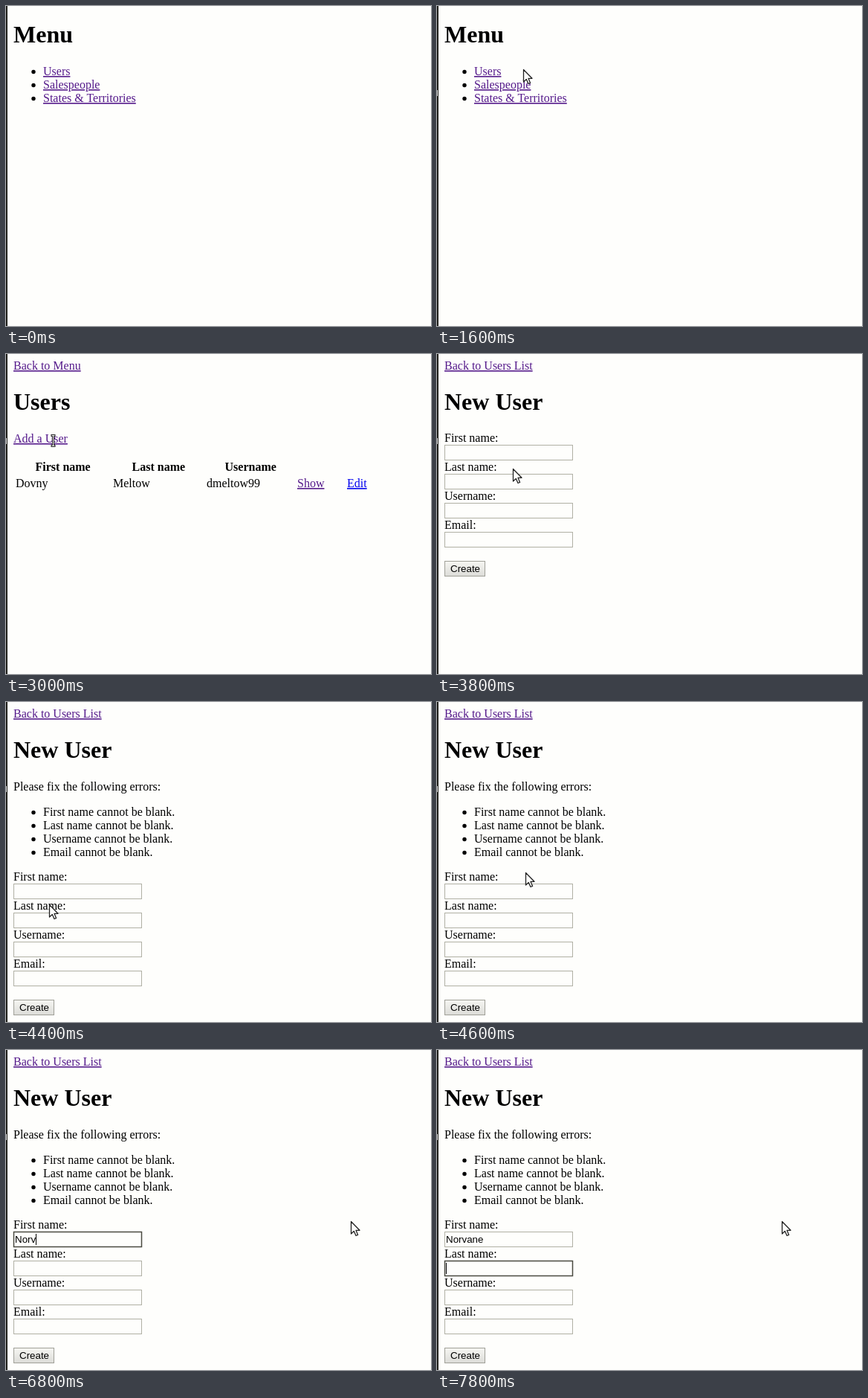
Animation of 572 by 430 pixels, one loop 8 s. Source, as an HTML page:

```html
<!DOCTYPE html>
<html lang="en">
<head>
<meta charset="utf-8">
<title>User form demo</title>
<style>
html, body { margin: 0; width: 100%; height: 100%; overflow: hidden; background: #fefefc; }
svg { display: block; }
text { font: 16px "Liberation Serif", serif; }
.title { font-size: 32px; font-weight: bold; }
.head { font-weight: bold; }
.link {
  fill: #551a8b;
  text-decoration: underline 1px;
  text-underline-offset: 1px;
  text-decoration-skip-ink: none;
}
.fresh { fill: #0000ee; }
.ui { font: 13.333px "Liberation Sans", sans-serif; }
.field { fill: #fefefc; stroke: #b0b0a4; }
.focused { stroke: #4a4a40; stroke-width: 1.5; }
.button { fill: url(#buttonFill); stroke: #a0a098; }
.pointer { fill: #fefefc; stroke: #222; stroke-width: 1.3; stroke-linejoin: round; }
.beam { fill: none; stroke: #222; }
</style>
</head>
<body>
<svg width="572" height="430" viewBox="0 0 572 430">
  <defs>
    <linearGradient id="buttonFill" x2="0" y2="1">
      <stop stop-color="#f6f6f2"/>
      <stop offset="1" stop-color="#dcdcd8"/>
    </linearGradient>
  </defs>
  <g id="page"></g>
  <path d="M0 0H2V430H0Z" fill="#242420"/>
  <path id="notch" d="M0 113H1V121H0Z" fill="#ddd"/>
  <g id="cursor"></g>
</svg>
<script>
const LOOP = 8000, STEP = 200;
const ERROR_SHIFT = 122;
const FIRST_NAME = "Norvane";
const LABELS = ["First name", "Last name", "Username", "Email"];

const CURSORS = {
  none: "",
  arrow: '<path class="pointer" d="M.5 .5V17L4.3 13.4 7 19.5 9.6 18.4 7 12.3H12Z"/>',
  beam: `<path class="beam" stroke-width="3" d="M-2.5 -6.5H3.5M.5 -6.5V7.5M-2.5 7.5H3.5"/>
    <path class="beam" style="stroke: #fefefc" d="M-1.5 -6.5H2.5M.5 -6.5V7.5M-1.5 7.5H2.5"/>`,
  hand: '<path class="pointer" d="M-1.5 1Q0 -1 1.5 1V7L8 8.5Q10 9 10 11L8.5 18H0L-5 11Q-5 8.5 -1.5 11Z"/>'
};

// time, x, y, cursor shape
const PATH = [
  [0, 333, 276, "none"], [200, 333, 276, "arrow"], [800, 125, 126, "hand"],
  [1000, 90, 107, "hand"], [1200, 72, 92, "hand"], [1400, 105, 86, "arrow"],
  [1600, 116, 85, "arrow"], [1800, 74, 87, "hand"], [2200, 66, 88, "arrow"],
  [2600, 66, 95, "arrow"], [3000, 63, 116, "beam"], [3200, 63, 115, "hand"],
  [3400, 66, 118, "beam"], [3600, 87, 138, "arrow"], [3800, 102, 154, "arrow"],
  [4000, 62, 238, "arrow"], [4200, 38, 287, "arrow"], [4400, 58, 272, "arrow"],
  [4600, 119, 229, "arrow"], [4800, 112, 237, "arrow"], [5000, 92, 254, "beam"],
  [5400, 120, 252, "beam"], [5600, 195, 238, "arrow"], [6000, 464, 230, "arrow"],
  [LOOP, 464, 230, "arrow"]
];

const ruler = document.createElement("canvas").getContext("2d");
ruler.font = '13.333px "Liberation Sans", sans-serif';

const byId = id => document.getElementById(id);
const text = (x, y, words, style = "") => `<text x="${x}" y="${y}" class="${style}">${words}</text>`;
const box = (x, y, w, h, style) =>
  `<rect x="${x}" y="${y}" width="${w}" height="${h}" class="${style}"/>`;
const list = (y, items, style) => items.map((item, i) =>
  `<circle cx="37" cy="${y + 18 * i - 4.5}" r="2.7"/>` + text(50, y + 18 * i, item, style)).join("");

function menuPage() {
  return text(10, 49, "Menu", "title") +
    list(93, ["Users", "Salespeople", "States &amp; Territories"], "link");
}

function usersPage() {
  return text(10, 21, "Back to Menu", "link") + text(10, 75, "Users", "title") +
    text(10, 119, "Add a User", "link") +
    text(39.5, 157, "First name", "head") + text(169.5, 157, "Last name", "head") +
    text(294.5, 157, "Username", "head") +
    text(13, 179, "Dovny") + text(144, 179, "Meltow") + text(270, 179, "dmeltow99") +
    text(392, 179, "Show", "link") + text(459, 179, "Edit", "link fresh");
}

function formPage(t) {
  const hasErrors = t >= 4400;
  const shift = hasErrors ? ERROR_SHIFT : 0;
  const focus = t < 5200 ? -1 : t < 7600 ? 0 : 1;
  const typed = FIRST_NAME.slice(0, Math.max(0, (t - 6000) / STEP));
  const caretOn = t < 5700 || t >= 6200;

  let page = text(10, 21, "Back to Users List", "link") + text(10, 75, "New User", "title");
  if (hasErrors) {
    page += text(10, 119, "Please fix the following errors:") +
      list(153, LABELS.map(label => label + " cannot be blank."));
  }
  LABELS.forEach((label, i) => {
    const y = 118 + 39 * i + shift;
    page += text(10, y, label + ":") +
      box(10.5, y + 4.5, 172, 20, i === focus ? "field focused" : "field");
    if (i === 0) page += text(12, y + 19, typed, "ui");
    if (i === focus && caretOn) {
      const x = 12.5 + (i === 0 ? Math.round(ruler.measureText(typed).width) : 0);
      page += `<path d="M${x} ${y + 7}v15" stroke="#000"/>`;
    }
  });
  return page + box(10.5, 278.5 + shift, 54, 20, "button") + text(18, 293 + shift, "Create", "ui");
}

function drawCursor(t) {
  const next = PATH.findIndex(point => point[0] > t);
  const [t0, x0, y0, shape] = PATH[next - 1];
  const [t1, x1, y1] = PATH[next];
  const k = (t - t0) / (t1 - t0);
  byId("cursor").innerHTML = CURSORS[shape];
  byId("cursor").setAttribute("transform",
    `translate(${Math.round(x0 + (x1 - x0) * k)} ${Math.round(y0 + (y1 - y0) * k)})`);
}

let shown = -1;
function render(now) {
  const t = Math.floor(now % LOOP / STEP) * STEP;
  if (t !== shown) {
    shown = t;
    byId("page").innerHTML = t < 2200 ? menuPage() : t < 3400 ? usersPage() : formPage(t);
    byId("notch").style.display = t < 1400 ? "none" : "";
    drawCursor(t);
  }
  requestAnimationFrame(render);
}
render(performance.now());
</script>
</body>
</html>
```
